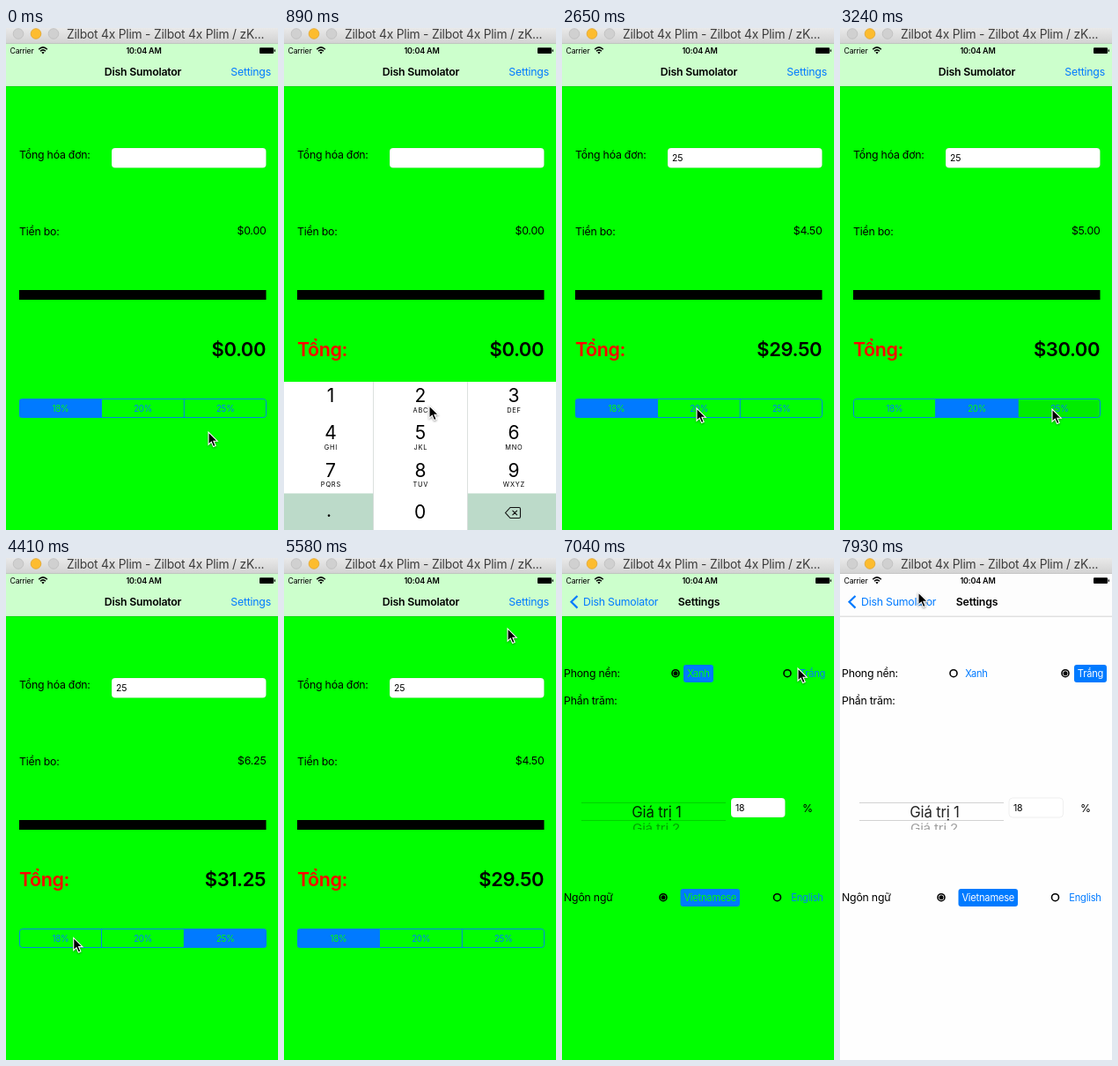
Animation, 309 px wide and 569 px high, one loop 8000 ms. Source, as an HTML page:

```html
<!DOCTYPE html>
<html lang="vi">
<head>
<meta charset="utf-8">
<title>Tip screen</title>
<style>
  html, body { margin: 0; width: 100%; height: 100%; overflow: hidden; }
  svg {
    --bg: #00ff00; --nav: #ccffcc; --key: #bcdac9;
    display: block; width: 309px; height: 569px;
    font: 12.3px Inter, "Noto Sans", sans-serif; letter-spacing: -.017em;
  }
  svg.white { --bg: #fefefe; --nav: #fdfdfd; }
  .bg { fill: var(--bg); }
  .nav { fill: var(--nav); }
  .blue { fill: #007aff; }
  .bold { font-weight: 600; }
  .mid { text-anchor: middle; }
  .end { text-anchor: end; }
  .big { font-size: 22px; font-weight: 600; letter-spacing: -.02em; }
  .small { font-size: 10.5px; }
  .btn { font-size: 11.1px; }
  .seg { font-size: 9.7px; fill: #007aff; }
  .on { fill: var(--bg); }
  .line { stroke: #007aff; stroke-width: .9; fill: none; }
  .field { fill: #fff; stroke: #000; stroke-opacity: .09; stroke-width: .7; }
  .rule { stroke: #000; stroke-opacity: .22; stroke-width: .8; }
  .ring { fill: none; stroke: #000; stroke-width: 1.6; }
  .digit { font-size: 21px; letter-spacing: 0; }
  .letters { font-size: 7.4px; letter-spacing: .8px; }
</style>
</head>
<body>
<svg id="stage" viewBox="0 0 309 569">
  <defs>
    <linearGradient id="chrome" x2="0" y2="1">
      <stop stop-color="#e9e9e9"/><stop offset="1" stop-color="#d2d2d2"/>
    </linearGradient>
    <clipPath id="wheel"><rect x="20" y="270" width="170" height="38"/></clipPath>
  </defs>

  <g id="main">
    <rect class="bg" y="66" width="309" height="503"/>
    <text x="15" y="148">Tổng hóa đơn:</text>
    <rect class="field" x="120" y="136" width="175.5" height="22.5" rx="4"/>
    <text id="bill" class="small" x="125" y="151"></text>
    <text x="15" y="235">Tiền bo:</text>
    <text id="tip" class="end" x="295.5" y="234"></text>
    <rect x="15" y="297" width="280.5" height="11"/>
    <text id="label" class="big" x="15" y="372" fill="#f00" style="font-size:21.5px">Tổng:</text>
    <text id="total" class="big end" x="295" y="372"></text>
    <rect id="press" x="202" y="420.5" width="93" height="21" fill-opacity=".07"/>
    <rect id="chosen" class="blue" y="420.5" width="93.5" height="21" rx="1.5"/>
    <rect class="line" x="15.5" y="420.5" width="280" height="21" rx="3"/>
    <path class="line" d="M108.5 420.5v21M202.3 420.5v21"/>
    <g id="rates"></g>
    <g id="keys"></g>
  </g>

  <g id="settings">
    <rect class="bg" y="66" width="309" height="503"/>
    <text x="2" y="135">Phong nền:</text>
    <text x="2" y="166">Phần trăm:</text>
    <path class="rule" d="M22 277.5H186M22 297.5H186"/>
    <text class="mid" x="107.5" y="294" style="font-size:16.8px" fill="#000" fill-opacity=".86">Giá trị 1</text>
    <g clip-path="url(#wheel)">
      <text class="mid" transform="translate(107 311) scale(1 .85)" style="font-size:15.2px" fill-opacity=".38">Giá trị 2</text>
    </g>
    <rect class="field" x="192" y="272" width="61.5" height="22" rx="4"/>
    <text class="small" x="197" y="287">18</text>
    <text x="273" y="287.5">%</text>
    <text x="2" y="389">Ngôn ngữ</text>
    <g id="radios"></g>
  </g>

  <rect class="nav" y="17" width="309" height="49"/>
  <path class="rule" d="M0 66.2H309"/>
  <g id="mainNav">
    <text id="mainTitle" class="bold mid" x="155.5" y="54">Dish Sumolator</text>
    <text class="blue end" x="301" y="54">Settings</text>
  </g>
  <g id="settingsNav">
    <path d="M17.5 43L10.5 49.8L17.5 56.6" fill="none" stroke="#007aff" stroke-width="2.2"/>
    <text id="back" class="blue" x="24" y="54">Dish Sumolator</text>
    <text id="settingsTitle" class="bold mid" x="155.5" y="54">Settings</text>
  </g>

  <text x="4.5" y="29" style="font-size:8.7px">Carrier</text>
  <g fill="none" stroke="#000" stroke-width="1.5">
    <path d="M37.2 24.2Q42 19.6 46.8 24.2M39 26.3Q42 23.5 45 26.3"/>
  </g>
  <path d="M40.3 27.6Q42 26.2 43.7 27.6L42 29.4Z"/>
  <text class="bold mid" x="156.5" y="29" style="font-size:9px">10:04 AM</text>
  <rect x="288" y="22.3" width="16" height="6.6" rx="1"/>
  <rect x="304.6" y="24.3" width="1.3" height="2.6" rx=".6"/>

  <rect width="309" height="17.5" fill="url(#chrome)"/>
  <path d="M0 17.5H309" stroke="#b9b9b9" stroke-width=".7"/>
  <g stroke-width=".8">
    <circle cx="14" cy="6.5" r="5.8" fill="#d0d0d0" stroke="#bcbcbc"/>
    <circle cx="34" cy="6.5" r="5.8" fill="#fdbc2e" stroke="#e0a32a"/>
    <circle cx="54" cy="6.5" r="5.8" fill="#d0d0d0" stroke="#bcbcbc"/>
  </g>
  <text x="69" y="12" fill="#3c3c3c" style="font-size:13.8px">Zilbot 4x Plim - Zilbot 4x Plim / zK...</text>

  <path id="cursor" d="M0 0V14.2L3.3 11.2L5.6 16.6L8.2 15.5L5.9 10.2H10.2Z"
    stroke="#fff" stroke-width="1.1" style="filter:drop-shadow(0 1px 1px #0006)"/>
</svg>

<script>
const $ = id => document.getElementById(id);
const LOOP = 8000, TICK = 146.7;
const RATES = [18, 20, 25];

$('rates').innerHTML = RATES.map((r, i) =>
  `<text class="seg mid" x="${62 + i * 93.6}" y="434.6">${r}%</text>`).join('');
const rateTexts = [...$('rates').children];

// Number pad
const letters = ['', 'ABC', 'DEF', 'GHI', 'JKL', 'MNO', 'PQRS', 'TUV', 'WXYZ'];
const cols = [53, 155, 261];
$('keys').innerHTML =
  `<rect y="401" width="309" height="168" fill="#fff"/>
   <path d="M0 527.5H101.5V569H0ZM208.5 527.5H309V569H208.5Z" style="fill:var(--key)"/>
   <path d="M101.5 401V569M208.5 401V569" stroke="#d4d8d6" stroke-width=".8"/>` +
  letters.map((s, i) => {
    const x = cols[i % 3], y = 424 + Math.floor(i / 3) * 42.3;
    return `<text class="digit mid" x="${x}" y="${y}">${i + 1}</text>
      <text class="letters mid" x="${x + .4}" y="${y + 11.8}">${s}</text>`;
  }).join('') +
  `<text class="digit mid" x="51" y="554">.</text>
   <text class="digit mid" x="154.5" y="556">0</text>
   <path d="M251.5 549.5L257 543.5H267Q268.5 543.5 268.5 545V554Q268.5 555.5 267 555.5H257ZM259.5 546.8L264.9 552.2M264.9 546.8L259.5 552.2"
     fill="none" stroke="#111" stroke-width="1.1"/>`;

// Option buttons on the settings page: radio x, button x, width, y, caption
const options = [
  [129, 138, 34, 131, 'Xanh'], [256, 266, 37, 131, 'Trắng'],
  [115, 134.5, 67.5, 385, 'Vietnamese'], [244.5, 256, 45, 385, 'English']
];
$('radios').innerHTML = options.map(([rx, x, w, y, name]) =>
  `<g><circle class="ring" cx="${rx}" cy="${y - .3}" r="4"/>
   <circle cx="${rx}" cy="${y - .3}" r="2.5"/>
   <rect class="blue" x="${x}" y="${y - 10}" width="${w}" height="20" rx="3"/>
   <text class="btn mid" x="${x + w / 2}" y="${y + 4}">${name}</text></g>`).join('');
const radios = [...$('radios').children];

function setOption(i, on) {
  const [, dot, box, text] = radios[i].children;
  dot.style.display = box.style.display = on ? '' : 'none';
  text.setAttribute('class', 'btn mid ' + (on ? 'on' : 'blue'));
}

const ease = p => p * p * (3 - 2 * p);
const ramp = (t, a, b) => ease(Math.min(1, Math.max(0, (t - a) / (b - a))));

// Pointer stops: time, x, y
const path = [
  [0, 230, 458], [440, 175, 147], [590, 175, 147], [880, 165, 428], [1180, 165, 428],
  [1480, 158, 462], [1640, 158, 462], [1910, 198, 285], [2220, 198, 285],
  [2640, 153, 431], [2800, 153, 431], [3220, 241, 432], [3660, 241, 432],
  [4100, 158, 433], [4500, 62, 430], [4720, 62, 430], [5570, 254, 80],
  [5860, 274, 48], [6440, 274, 48], [7030, 268, 125], [7240, 268, 125], [7910, 89, 39]
];
function pointer(t) {
  const n = path.findIndex(s => s[0] > t);
  if (n < 0) return path.at(-1).slice(1);
  const [a, b] = [path[n - 1], path[n]], p = ramp(t, a[0], b[0]);
  return [1, 2].map(k => a[k] + (b[k] - a[k]) * p);
}

const move = (id, x, y = 0) => $(id).setAttribute('transform', `translate(${x} ${y})`);
const money = v => '$' + v.toFixed(2);

function draw(t) {
  const bill = t < 1170 ? '' : t < 1610 ? '2' : '25';
  const pick = t < 2790 ? 0 : t < 3370 ? 1 : t < 4690 ? 2 : 0;
  const tip = bill * RATES[pick] / 100;
  $('bill').textContent = bill;
  $('tip').textContent = money(tip);
  $('total').textContent = money(+bill + tip);
  $('label').style.opacity = ramp(t, 400, 740);
  $('chosen').setAttribute('x', 15.3 + pick * 93.4);
  $('press').style.display = t > 3220 && t < 3370 ? '' : 'none';
  rateTexts.forEach((e, i) => e.style.fill = i === pick ? 'var(--bg)' : '');

  const shown = ramp(t, 460, 800) - ramp(t, 1942, 2208);
  move('keys', 0, 168 * (1 - shown));

  const p = ramp(t, 6000, 6420);
  move('main', -93 * p);
  move('settings', 309 * (1 - p));
  $('mainNav').style.opacity = 1 - p;
  $('settingsNav').style.opacity = p;
  move('mainTitle', -90 * p);
  move('back', 90 * (1 - p));
  move('settingsTitle', 120 * (1 - p));

  const white = t > 7180;
  $('stage').classList.toggle('white', white);
  [!white, white, true, false].forEach((on, i) => setOption(i, on));
  move('cursor', ...pointer(t));
}

const start = performance.now();
function frame(now) {
  const t = Math.max(0, now - start) % LOOP;
  draw(Math.floor((t + 6) / TICK) * TICK);
  requestAnimationFrame(frame);
}
draw(0);
requestAnimationFrame(frame);
</script>
</body>
</html>
```
